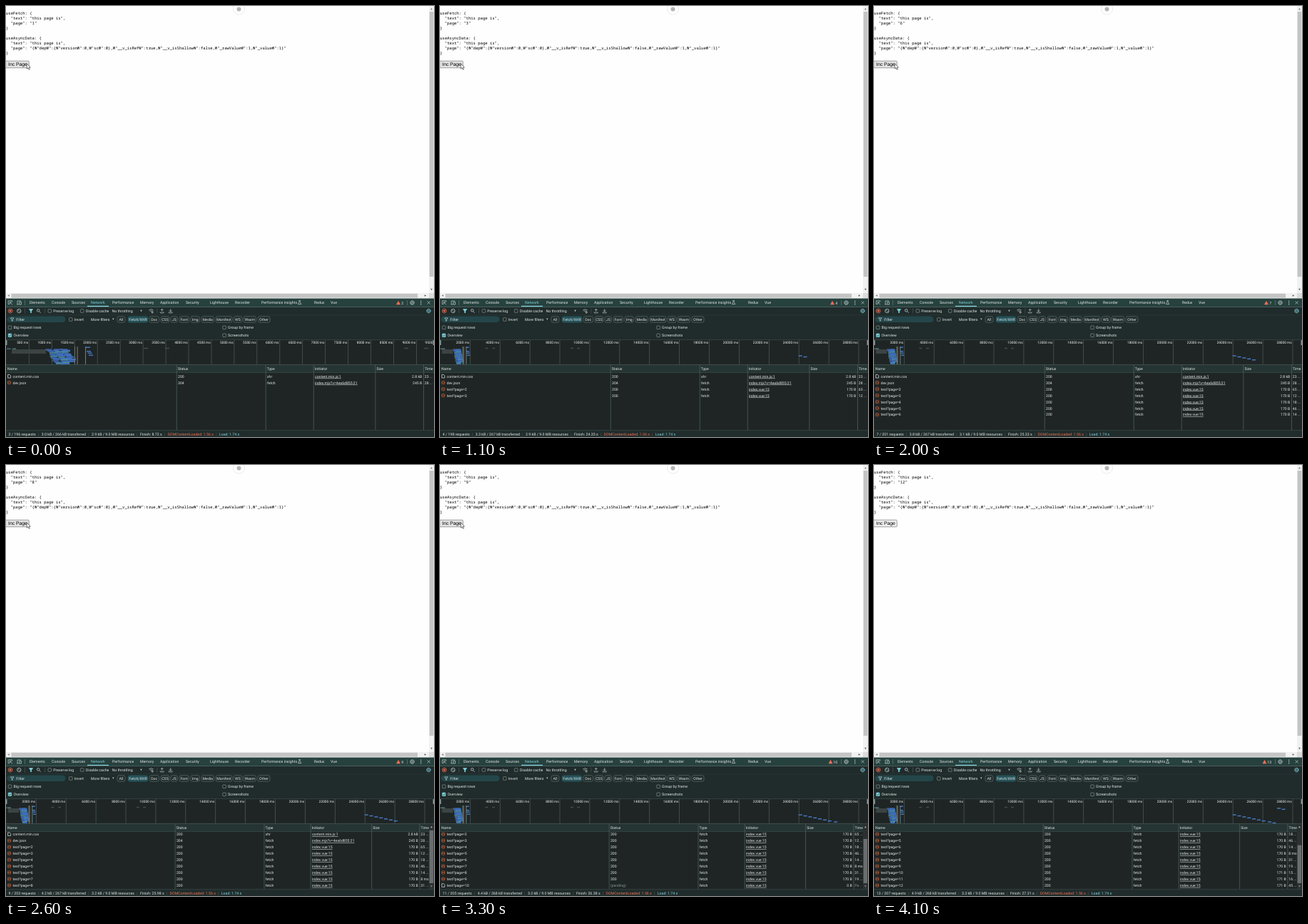
An HTML page that plays this animation: 600 by 605 pixels, repeating every 4.9 s.

```html
<!DOCTYPE html>
<html lang="en">
<head>
<meta charset="utf-8">
<title>Page counter with network panel</title>
<style>
  html, body { margin: 0; width: 100%; height: 100%; overflow: hidden; background: #fefefe; }
  svg { display: block; width: 600px; height: 605px; }
  text { font: 5.25px Roboto, "Open Sans", sans-serif; fill: #e3e8e8; white-space: pre; text-rendering: geometricPrecision; }
  .code { font: 5.565px "Noto Sans Mono", "DejaVu Sans Mono", monospace; fill: #000; }
  .button { font: 6.8px "Liberation Sans", Arial, sans-serif; fill: #000; }
  .tick { font-size: 4.8px; fill: #f4f7f7; }
  .cell { font-size: 5.15px; }
  .link { text-decoration: underline; }
  .sep { fill: #566765; }
</style>
</head>
<body>
<svg viewBox="0 0 600 605" xmlns="http://www.w3.org/2000/svg">
  <clipPath id="body"><rect y="514.3" width="600" height="81"/></clipPath>
  <clipPath id="overview"><rect y="468.5" width="600" height="34.5"/></clipPath>
  <g id="fixed"></g>
  <g id="live"></g>
</svg>
<script>
const LOOP = 4900;
// time, page shown, last page requested
const STEPS = [
  [0, 1, 1], [700, 1, 2], [800, 2, 2], [1000, 2, 3], [1100, 3, 3], [1300, 3, 4], [1400, 4, 4],
  [1700, 5, 5], [1900, 5, 6], [2000, 6, 6], [2200, 6, 7], [2300, 7, 7], [2600, 8, 8],
  [2900, 8, 9], [3000, 9, 9], [3300, 9, 10], [3400, 10, 10], [3600, 10, 11], [3700, 11, 11],
  [4000, 11, 12], [4100, 12, 12]
];
const TIMES = ['65 ...', '12 ...', '18 ...', '46 ...', '14 ...', '8 ms', '31 ...', '19 ...', '15 ...', '16 ...', '45 ...'];
const CYAN = '#83d3df', ICON = '#c3cfcd', LINE = '#40514f', RED = '#ee6f55';
const PANEL = '#1f2525', BAR = '#202c2b';

const rect = (x, y, w, h, fill, extra = '') =>
  `<rect x="${x}" y="${y}" width="${w}" height="${h}" fill="${fill}" ${extra}/>`;
const path = (d, stroke = ICON, fill = 'none', width = .7) =>
  `<path d="${d}" stroke="${stroke}" fill="${fill}" stroke-width="${width}"/>`;
const dot = (x, y, r, fill, stroke = 'none') =>
  `<circle cx="${x}" cy="${y}" r="${r}" fill="${fill}" stroke="${stroke}" stroke-width=".8"/>`;
// y is the middle of the line
const text = (x, y, s, cls = '', extra = '') =>
  `<text x="${x}" y="${y + 1.9}" class="${cls}" ${extra}>${s}</text>`;
const endText = (x, y, s, cls) => text(x, y, s, cls, 'text-anchor="end"');
const tri = (x, y, dx, dy, fill) =>
  path(`M${x + dx} ${y + dy}L${x - dx - dy} ${y - dy - dx}L${x - dx + dy} ${y - dy + dx}Z`, 'none', fill);
const vline = (x, y, h, color = LINE) => rect(x, y, .8, h, color);

function checkbox(x, y, label, on) {
  return rect(x, y - 2.3, 4.6, 4.6, on ? CYAN : 'none', `rx=".7" stroke="${on ? CYAN : '#8fa09e'}" stroke-width=".6"`)
    + (on ? path(`M${x + 1} ${y}l1.1 1.2 1.8 -2.4`, '#16302f') : '')
    + text(x + 7.3, y, label);
}

function gear(x, y, color) {
  return dot(x, y, 2.1, 'none', color)
    + `<circle cx="${x}" cy="${y}" r="2.9" fill="none" stroke="${color}" stroke-width=".8" stroke-dasharray="1.2 1.08"/>`
    + dot(x, y, .7, color);
}

function pageFixed() {
  const lines = ['useFetch: {', '  "text": "this page is",', '', '}', '', 'useAsyncData: {', '  "text": "this page is",',
    '  "page": "{₩"dep₩":{₩"version₩":0,₩"sc₩":0},₩"__v_isRef₩":true,₩"__v_isShallow₩":false,₩"_rawValue₩":1,₩"_value₩":1}"', '}'];
  return rect(0, 0, 600, 411, '#fefefe')
    + lines.map((s, i) => text(0, 10 + 7 * i, s, 'code')).join('')
    + dot(326.5, 4, 8, '#fff', '#e4e4e4') + dot(326.5, 4.5, 3, '#b4b4b4')
    + rect(593, 0, 7, 410.5, '#f1f1f1') + rect(593.7, 8, 5.6, 372, '#c4c4c4')
    + tri(596.5, 4, 0, -1.3, '#777') + tri(596.5, 398, 0, 1.3, '#555')
    + rect(0, 403, 593, 7.5, '#f1f1f1') + rect(7.5, 403.8, 569.5, 5.8, '#c4c4c4')
    + tri(3.5, 406.5, -1.3, 0, '#777') + tri(588, 406.5, 1.3, 0, '#555')
    + rect(593, 403, 7, 7.5, '#dcdcdc');
}

function tabs() {
  const names = { Elements: 33, Console: 64, Sources: 92, Network: 119, Performance: 149, Memory: 188, Application: 216,
    Security: 252, Lighthouse: 286, Recorder: 321, 'Performance insights': 358, Redux: 432, Vue: 455 };
  return rect(0, 410.5, 600, 12, '#26413e') + rect(0, 422, 600, .6, '#466460')
    + path('M5 418.5H3.2V413.8H8.6V415.4M5.4 415.8l3.4 3.4M5.4 418.2v-2.4h2.4')
    + path('M16 418.6v-4.6h5M15 418.8h3.4M18.8 415.4h2.6v3.6h-2.6z') + vline(26, 413, 7, '#58736f')
    + Object.entries(names).map(([s, x]) => text(x, 416, s, '', s === 'Network' ? `style="fill:${CYAN}"` : '')).join('')
    + rect(114, 420.8, 30, 1.2, CYAN)
    + path('M410.3 413.6h2.6M411 413.6v2l-1.6 3h4.4l-1.6 -3v-2')
    + vline(562, 413, 7, '#58736f') + gear(569.5, 416.5, ICON)
    + [414.2, 416.5, 418.8].map(y => dot(581.7, y, .7, ICON)).join('')
    + path('M590.6 414.4l4 4m0 -4l-4 4');
}

function toolbar() {
  return rect(0, 422.6, 600, 46, BAR)
    + dot(6, 428, 2.9, 'none', RED) + rect(4.7, 426.7, 2.6, 2.6, RED, 'rx=".5"')
    + dot(18.3, 428, 2.7, 'none', ICON) + path('M16.4 426.1l3.8 3.8') + vline(26, 424.5, 7)
    + path('M32.4 425.6h5.2l-2 2.6v2.4h-1.2v-2.4z', CYAN, CYAN)
    + dot(45.2, 427.3, 1.8, 'none', ICON) + path('M46.6 428.7l2.1 2.1') + vline(54, 424.5, 7)
    + checkbox(59, 428, 'Preserve log') + checkbox(104.4, 428, 'Disable cache')
    + text(148.5, 428, 'No throttling') + tri(189.5, 428, 0, 1.2, ICON)
    + path('M200.3 427q3.2 -2.6 6.4 0M201.6 428.6q1.9 -1.5 3.8 0') + dot(205.2, 430, 1.1, 'none', ICON)
    + vline(211.5, 424.5, 7)
    + path('M218.7 429.3v-4M216.9 427l1.8 -1.8 1.8 1.8M216.3 429.4v1.4h4.8v-1.4')
    + path('M230.7 425.2v4M228.9 427.4l1.8 1.8 1.8 -1.8M228.3 429.4v1.4h4.8v-1.4')
    + gear(592.5, 428, CYAN) + rect(0, 433.6, 600, .5, '#2d3e3c');
}

function filters() {
  const chips = [['All', 156, 11], ['Fetch/XHR', 171, 28], ['Doc', 201, 13.5], ['CSS', 217, 12], ['JS', 231, 9.5],
    ['Font', 243, 13.5], ['Img', 259, 12.5], ['Media', 274, 17.5], ['Manifest', 294, 23], ['WS', 319, 12],
    ['Wasm', 333, 17.5], ['Other', 353, 17]];
  const chip = ([s, x, w]) => {
    const on = s === 'Fetch/XHR';
    return rect(x, 435.8, w, 8.4, on ? '#25535a' : 'none', `rx="2.4" stroke="${on ? '#25535a' : '#657a77'}" stroke-width=".6"`)
      + text(x + w / 2, 440, s, '', 'text-anchor="middle"');
  };
  return rect(1.5, 435.5, 82, 8.6, '#24464a', 'rx="4.3"')
    + path('M6.4 437.9h4.6l-1.8 2.2v2h-1v-2z') + text(14.3, 440, 'Filter')
    + checkbox(88.5, 440, 'Invert') + text(119, 440, 'More filters') + tri(150.3, 439.6, 0, 1.2, ICON)
    + chips.map(chip).join('')
    + checkbox(3.2, 451.3, 'Big request rows') + checkbox(303.8, 451.3, 'Group by frame')
    + checkbox(3.2, 462.3, 'Overview', true) + checkbox(303.8, 462.3, 'Screenshots')
    + rect(0, 468, 600, 35.5, PANEL) + rect(0, 468, 600, .6, LINE);
}

function random(seed) {
  return () => (seed = (seed * 16807) % 2147483647) / 2147483647;
}

// Start-up requests; no bar gets narrower than a few pixels
function burst(pxPerSecond) {
  const rnd = random(77), scale = pxPerSecond / 63.9;
  const bar = (x, y, w, c, h = 1.4) =>
    rect((x * scale).toFixed(1), y.toFixed(1), Math.max(4, w * scale).toFixed(1), h, c);
  let s = bar(8, 482, 48, '#3b4343', 6) + bar(1, 480.5, 6, '#4c6a78') + bar(9, 480.5, 5, '#59787c');
  [[55, 18], [65, 18], [76, 15]].forEach(([start, rows], pass) => {
    for (let r = 0; r < rows; r++) {
      const x = start + r * .75 + rnd() * 3, y = 481.4 + r * 1.22;
      s += bar(x, y, 8 + rnd() * 5, rnd() < .12 ? '#4d9a8c' : pass ? '#4170bd' : '#3a65ae');
    }
  });
  for (const [x, y] of [[112, 478.5], [113, 484], [114.5, 486.5], [116, 489.5]]) s += bar(x, y, 6, '#4a7cc6');
  for (const x of [193, 223, 558, 586]) s += bar(x, 479.8, 6, '#414d4e');
  return s + vline(96 * scale, 478, 25, '#62857a');
}

const finishTime = p => p === 1 ? 8.72 : p < 9 ? 24.35 + (p - 3) * .326 : 26.38 + (p - 9) * .31;

function overview(done, last) {
  const wide = last > 1, unit = wide ? 2000 : 500, gap = wide ? 41.9 : 31.95;
  const pxPerSecond = gap / unit * 1000;
  let s = '';
  for (let k = 1; k <= 20; k++) {
    s += vline((k * gap).toFixed(1), 468.5, 34.5, '#4a5554') + endText(k * gap - .8, 472.5, `${k * unit} ms`, 'tick');
  }
  s += burst(pxPerSecond)
    + vline(1.56 * pxPerSecond, 478, 25, '#d98058') + vline(1.74 * pxPerSecond, 478, 25, '#6d9fae');
  for (let p = 2; p <= done; p++) {
    const y = p < 11 ? 490.4 + (p - 2) * 1.42 : 481.2 + (p - 11) * 1.42;
    s += rect((finishTime(p) * pxPerSecond - .6).toFixed(1), y, 5, 1.4, '#4a7cc6');
  }
  s += rect(0, 469, 1.4, 7, '#8ba5a3', 'rx=".6"') + rect(598.6, 469, 1.4, 7, '#8ba5a3', 'rx=".6"');
  return `<g clip-path="url(#overview)">${s}</g>`;
}

function rowIcon(y, isFetch) {
  return isFetch
    ? rect(2.3, y - 2.2, 4.4, 4.4, 'none', 'rx="1.4" stroke="#d9693f" stroke-width=".6"')
      + path(`M3.9 ${y - 1}l-.8 1 .8 1M5.1 ${y - 1}l.8 1 -.8 1`, '#ee8355')
    : path(`M2.6 ${y - 2.3}h2.5l1.5 1.5v3.1h-4z`, '#dfe6e5');
}

function table(done, last) {
  const rows = [['content.min.css', 200, 'xhr', 'content.min.js:1', '2.8 kB', '23 ...'],
    ['dev.json', 304, 'fetch', 'index.mjs?v=4ea6d855:21', '245 B', '28 ...']];
  for (let p = 2; p <= last; p++) {
    rows.push(p > done
      ? [`test?page=${p}`, '(pending)', 'fetch', 'index.vue:15', '0 B', 'Pe...']
      : [`test?page=${p}`, 200, 'fetch', 'index.vue:15', p < 10 ? '170 B' : '171 B', TIMES[p - 2]]);
  }
  const n = rows.length, scrolls = n > 8, pitch = 8.98;
  const cols = scrolls ? [0, 236.7, 361.6, 426.7, 512.3, 579.5] : [0, 238.8, 363.8, 430.8, 517.5, 585];
  const top = scrolls ? 590 - (n - 1) * pitch : 519.7;
  let s = rect(0, 503.5, 600, 92.5, PANEL), body = '';
  rows.forEach(([name, status, type, from, size, time], i) => {
    const y = top + i * pitch, grey = status === '(pending)' ? 'style="fill:#8d9896"' : '';
    body += rowIcon(y, type === 'fetch' && !grey) + text(9.5, y, name, 'cell')
      + text(cols[1] + 2.2, y, status, 'cell', grey) + text(cols[2] + 2.2, y, type, 'cell')
      + text(cols[3] + 2.2, y, from, 'cell link') + endText(cols[5] - 1.8, y, size, 'cell')
      + text(cols[5] + 1.8, y, time, 'cell', grey);
  });
  s += `<g clip-path="url(#body)">${body}</g>` + rect(0, 503.5, 600, 10.8, '#253533')
    + rect(0, 503.3, 600, .6, LINE) + rect(0, 514, 600, .6, LINE);
  ['Name', 'Status', 'Type', 'Initiator', 'Size', 'Time'].forEach((h, i) => {
    s += text(cols[i] + 2, 509.2, h, 'cell') + (i ? vline(cols[i], 503.5, 92, '#4a5f5c') : '');
  });
  if (scrolls) {
    const h = 75 * 91 / (9 * n + 11);
    s += rect(592.8, 503.8, 7.2, 92, '#2c3030') + rect(593.6, 587 - h, 5.6, h, '#6a6e6e')
      + tri(596.4, 508, 0, -1.3, '#b5b9b9') + tri(596.4, 591.5, 0, 1.3, '#8b9090');
  }
  return s;
}

function footer(done, last) {
  const k = done - 1, kB = v => v.toFixed(1);
  const parts = [
    `${last + 1} / ${last + 195} requests`,
    `${kB(2.995 + .17 * k)} kB / ${Math.round(266.3 + .17 * k)} kB transferred`,
    `${kB(2.865 + .041 * k)} kB / 9.0 MB resources`,
    `Finish: ${finishTime(done).toFixed(2)} s`,
    `<tspan fill="${RED}">DOMContentLoaded: 1.56 s</tspan>`,
    `<tspan fill="${CYAN}">Load: 1.74 s</tspan>`
  ];
  return rect(0, 595.8, 600, 9.2, BAR) + rect(0, 595.5, 600, .6, LINE)
    + text(3.6, 600.8, parts.join('<tspan class="sep" dx="3.3">|</tspan><tspan dx="3.3">&#8203;</tspan>'));
}

function live(done, last) {
  const hover = done < 12, errors = done + 1;
  return text(0, 24, `  "page": "${done}"`, 'code')
    + rect(-.4, 77.2, 32.6, 9.6, hover ? '#e3e3e3' : '#efefef', 'rx="1" stroke="#777" stroke-width=".7"')
    + text(3, 82.4, 'Inc Page', 'button')
    + (hover ? path('M29.2 80.8v7.4l1.7 -1.5 1.2 2.7 1.2 -.6 -1.2 -2.5h2.2z', '#222', '#fff', .6) : '')
    + path(`M${errors > 9 ? 547.5 : 550} 414.3l2.6 4.7h-5.2z`, RED, RED, .5)
    + endText(557.2, 416.8, errors)
    + overview(done, last) + table(done, last) + footer(done, last);
}

document.getElementById('fixed').innerHTML = pageFixed() + tabs() + toolbar() + filters();
const liveLayer = document.getElementById('live');
let shown;

function tick() {
  const t = performance.now() % LOOP;
  const step = STEPS.findLast(([start]) => start <= t);
  if (step !== shown) {
    shown = step;
    liveLayer.innerHTML = live(step[1], step[2]);
  }
  requestAnimationFrame(tick);
}
tick();
</script>
</body>
</html>
```
